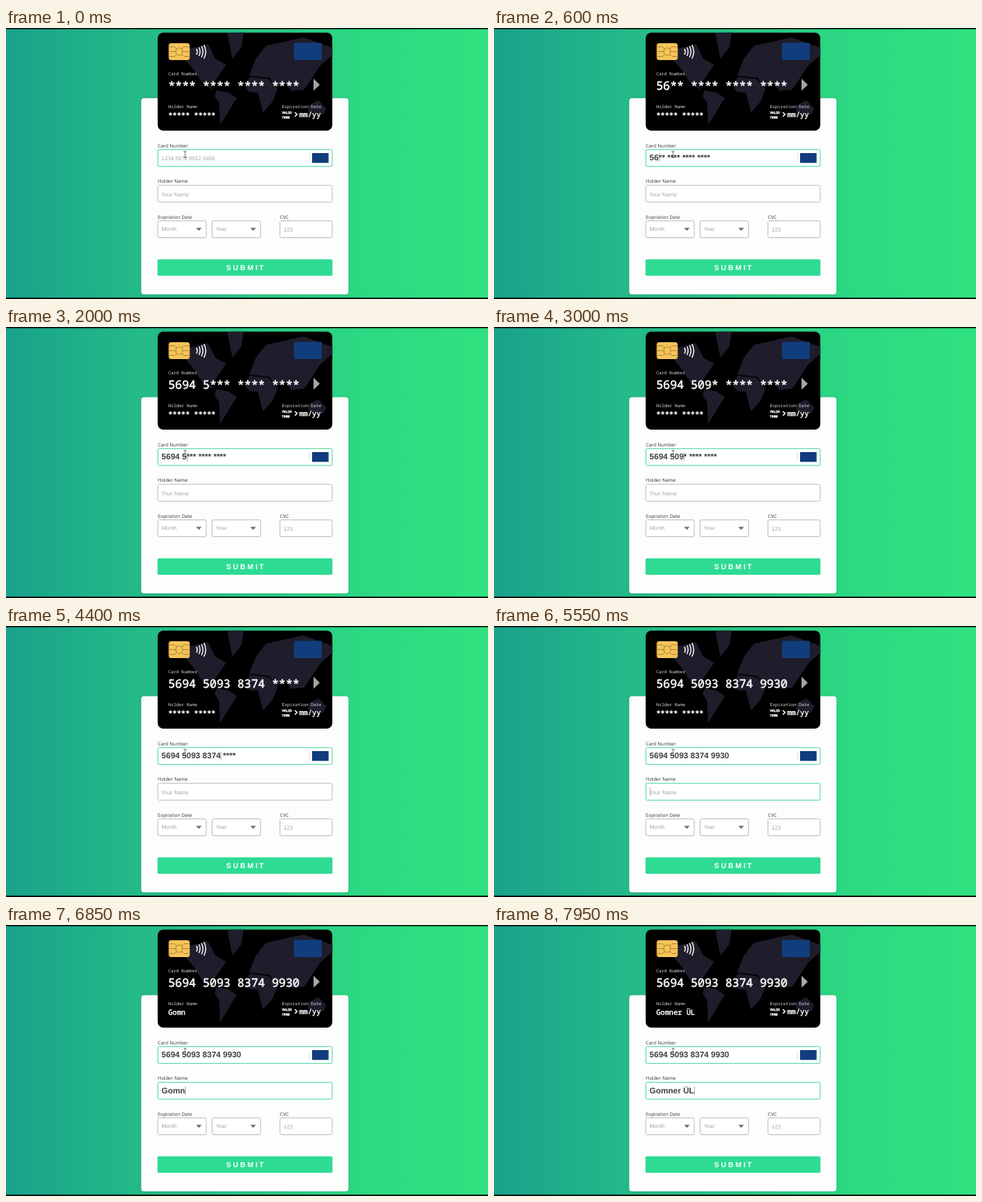
These frames come from a looping animation (600x338 px, 8 s). An HTML page with a canvas:

```html
<!DOCTYPE html>
<html lang="en">
<head>
<meta charset="utf-8">
<title>Card form</title>
<style>
  html, body { margin: 0; width: 100%; height: 100%; overflow: hidden; background: #000; }
  canvas { display: block; width: 600px; height: 338px; }
</style>
</head>
<body>
<canvas id="stage"></canvas>
<script>
const W = 600, H = 338, LOOP = 8000, BLINK = 530;
const LEFT = 189, WIDTH = 217, RIGHT = LEFT + WIDTH, TEXT_X = 193.6;
const GREEN = '#2edb93', NAVY = '#123d7d', GRAY = '#a3a8a6', INK = '#3c4045';
const SANS = '"Liberation Sans", Arial, sans-serif';
const MONO = '"Noto Sans Mono", "DejaVu Sans Mono", monospace';
const LABEL = '"Open Sans", "Noto Sans", sans-serif';

const NUMBER = '5694 5093 8374 9930';
const HOLDER = 'Gomner ÜL';
const DIGITS = 16, FOCUS_NAME = 5300;

// Typing speeds up along the number; the name is typed evenly
const digitTime = n => -413 + 521 * n - 11.1 * n * n;
const nameTime = n => 6000 + 200 * n;

// Key points as longitude, latitude
const continents = {
  northAmerica: [-166,66, -95,72, -80,60, -57,53, -81,27, -97,25, -83,9, -106,21, -125,46, -145,60],
  greenland: [-55,78, -20,79, -25,70, -44,60],
  southAmerica: [-78,9, -52,4, -35,-7, -48,-27, -70,-54, -72,-18, -81,-4],
  africa: [-8,35, 32,31, 51,11, 40,-15, 20,-35, 9,4, -8,5, -17,15],
  eurasia: [-9,37, 5,60, 26,71, 105,76, 178,68, 140,52, 121,30, 106,10, 78,8, 67,25, 45,13, 35,33],
  australia: [114,-23, 136,-12, 153,-28, 146,-39, 116,-35]
};

const canvas = document.getElementById('stage');
const ctx = canvas.getContext('2d');
const ratio = window.devicePixelRatio || 1;
canvas.width = W * ratio;
canvas.height = H * ratio;
ctx.scale(ratio, ratio);
ctx.textRendering = 'geometricPrecision';

function box(x, y, w, h, r, fill, stroke, line = 1) {
  ctx.beginPath();
  ctx.roundRect(x, y, w, h, r);
  if (fill) { ctx.fillStyle = fill; ctx.fill(); }
  if (stroke) { ctx.strokeStyle = stroke; ctx.lineWidth = line; ctx.stroke(); }
}

function trace(points) {
  ctx.beginPath();
  for (const [x, y] of points) ctx.lineTo(x, y);
}

function fillShape(points, color) {
  trace(points);
  ctx.fillStyle = color;
  ctx.fill();
}

function line(points, color, width) {
  trace(points);
  ctx.strokeStyle = color;
  ctx.lineWidth = width;
  ctx.stroke();
}

function text(str, x, y, size, family, color, weight = 400, spacing = 0) {
  ctx.font = `${weight} ${size}px ${family}`;
  ctx.letterSpacing = spacing + 'px';
  ctx.fillStyle = color;
  ctx.fillText(str, x, y);
}

// Monospaced text with a 0.6 em advance; the outline thickens the strokes
function mono(str, x, y, advance, color = '#fff', outline = 0.4) {
  text(str, x, y, advance / 0.6, MONO, color);
  ctx.strokeStyle = color;
  ctx.lineWidth = outline;
  ctx.lineJoin = 'round';
  if (outline) ctx.strokeText(str, x, y);
}

function background() {
  const g = ctx.createLinearGradient(0, 0, W, 0);
  g.addColorStop(0, '#19a28b');
  g.addColorStop(0.28, '#24ba88');
  g.addColorStop(0.75, '#2dd982');
  g.addColorStop(1, '#30e27f');
  ctx.fillStyle = g;
  ctx.fillRect(0, 0, W, H);
  ctx.fillStyle = '#000';
  ctx.fillRect(0, 0, W, 1.4);
  ctx.fillRect(0, 336.4, W, 1.6);
}

// Mercator projection
function project(lon, lat) {
  const rad = Math.PI / 180, scale = 34;
  return [308 + scale * lon * rad,
          83 - scale * Math.log(Math.tan(Math.PI / 4 + lat * rad / 2))];
}

function worldMap() {
  for (const coast of Object.values(continents)) {
    const points = [];
    for (let i = 0; i < coast.length; i += 2) points.push(project(coast[i], coast[i + 1]));
    fillShape(points, '#1f1d2b');
  }
}

function chip() {
  const cx = 215.6, cy = 29.5, brown = '#9b7430';
  box(cx - 13.1, cy - 10.4, 26.2, 20.8, 3, '#f4c458');
  box(cx - 4, cy - 4.5, 8, 9, 3, null, brown, 0.7);
  for (const sx of [-1, 1]) {
    line([[cx + sx * 4, cy], [cx + sx * 13, cy]], brown, 0.7);
    for (const sy of [-1, 1]) {
      line([[cx + sx * 3, cy + sy * 3.6], [cx + sx * 6, cy + sy * 6], [cx + sx * 13, cy + sy * 6]], brown, 0.7);
    }
  }
}

function waves() {
  ctx.strokeStyle = '#f2f2f2';
  ctx.lineWidth = 1.4;
  for (let i = 0; i < 4; i++) {
    ctx.beginPath();
    ctx.arc(230, 29.6, 8 + i * 3.5, -0.48, 0.48);
    ctx.stroke();
  }
}

function card(number, name) {
  const dim = '#d5d5d5';
  ctx.save();
  box(188.8, 5.8, 217.4, 122.2, 7, '#000');
  ctx.clip();
  worldMap();
  chip();
  waves();
  box(358.5, 18.5, 34.5, 21.5, 1, NAVY);
  mono('Card Number', 202, 59, 3.28, dim, 0);
  mono(number, 202, 76.8, 8.6, '#fff', 0.5);
  mono('Holder Name', 202, 100, 3.28, dim, 0);
  mono(name, 202, 111.6, 5.36);
  mono('Expiration Date', 343.5, 99.6, 3.28, dim, 0);
  mono('VALID', 343.5, 107, 2.45);
  mono('THRU', 343.5, 112.8, 2.45);
  mono('mm/yy', 365, 111.3, 5.36);
  line([[359.6, 105.2], [362.3, 107.8], [359.6, 110.4]], '#fff', 1.4);
  fillShape([[382.8, 63.3], [390.6, 70.8], [382.8, 78.3]], '#a6a6a6');
  ctx.restore();
}

const field = (x, y, w, active) =>
  box(x, y, w, 21, 1.6, '#fff', active ? '#4fd9a4' : '#bcc3be', 1);
const hint = (str, x, y) => text(str, x, y, 6.83, SANS, GRAY);
const typed = (str, y) => text(str, TEXT_X, y, 10.2, SANS, INK, 700);
const label = (str, x, y) => text(str, x, y, 5.95, LABEL, '#33383b');

function caret(str, y) {
  ctx.font = `700 10.2px ${SANS}`;
  ctx.letterSpacing = '0px';
  ctx.fillStyle = '#8a8f8d';
  ctx.fillRect(TEXT_X + 0.2 + ctx.measureText(str).width, y - 5.3, 0.7, 10.6);
}

function pointer() {
  const x = 223, top = 154, bottom = 161.5;
  for (const y of [top, bottom]) line([[x - 1.8, y], [x + 1.8, y]], '#444', 0.7);
  line([[x, top], [x, bottom]], '#444', 0.7);
}

function select(x, str) {
  field(x, 240.6, 60.2, false);
  hint(str, x + 4.4, 253.3);
  fillShape([[x + 47.6, 249.2], [x + 54.6, 249.2], [x + 51.1, 253]], '#686c6a');
}

function form(number, digits, name, onName, caretOn) {
  label('Card Number', LEFT, 148.6);
  label('Holder Name', LEFT, 193.4);
  label('Expiration Date', LEFT, 238);
  label('CVC', 341, 238);

  field(LEFT, 151.7, WIDTH, true);
  if (digits) typed(number, 165.4);
  else hint('1234 5678 9012 3456', TEXT_X, 164.9);
  ctx.fillStyle = '#d5d9d7';
  ctx.fillRect(377.4, 156.5, 0.8, 11);
  box(381, 156, 20.6, 12.2, 0.5, NAVY);

  field(LEFT, 196.2, WIDTH, onName);
  if (name) typed(name, 210.2);
  else hint('Your Name', TEXT_X, 209.8);

  select(LEFT, 'Month');
  select(256.6, 'Year');
  field(341, 240.6, RIGHT - 341, false);
  hint('123', 345.6, 253.9);

  if (caretOn) {
    if (onName) caret(name, 206.7);
    else caret(digits ? number.split('*')[0].trimEnd() : '', 162);
  }
  pointer();

  box(188.6, 288.6, 217.8, 20.4, 1.6, GREEN);
  text('SUBMIT', 274, 302.1, 9.1, SANS, '#fff', 700, 2.4);
}

// How many of the first `max` keys were pressed by time t
function pressed(keyTime, max, t) {
  let n = 0;
  while (n < max && keyTime(n + 1) <= t) n++;
  return n;
}

function draw(t) {
  const digits = pressed(digitTime, DIGITS, t);
  const letters = pressed(nameTime, HOLDER.length, t);
  const name = HOLDER.slice(0, letters);
  const onName = t >= FOCUS_NAME;
  let seen = 0;
  const number = NUMBER.replace(/\d/g, d => seen++ < digits ? d : '*');

  // The caret's blink restarts with every keystroke
  const last = letters ? nameTime(letters) : onName ? FOCUS_NAME : digits ? digitTime(digits) : -BLINK;
  const caretOn = (t - last) % (2 * BLINK) < BLINK;

  background();
  ctx.shadowColor = 'rgba(0,0,0,.2)';
  ctx.shadowBlur = 3 * ratio;
  box(168.3, 87.4, 258, 244.8, 3.5, '#fdfdfd');
  ctx.shadowColor = 'transparent';
  card(number, name || '***** *****');
  form(number, digits, name, onName, caretOn);
}

const start = performance.now();
function tick() {
  draw((performance.now() - start) % LOOP);
  requestAnimationFrame(tick);
}
tick();
</script>
</body>
</html>
```
